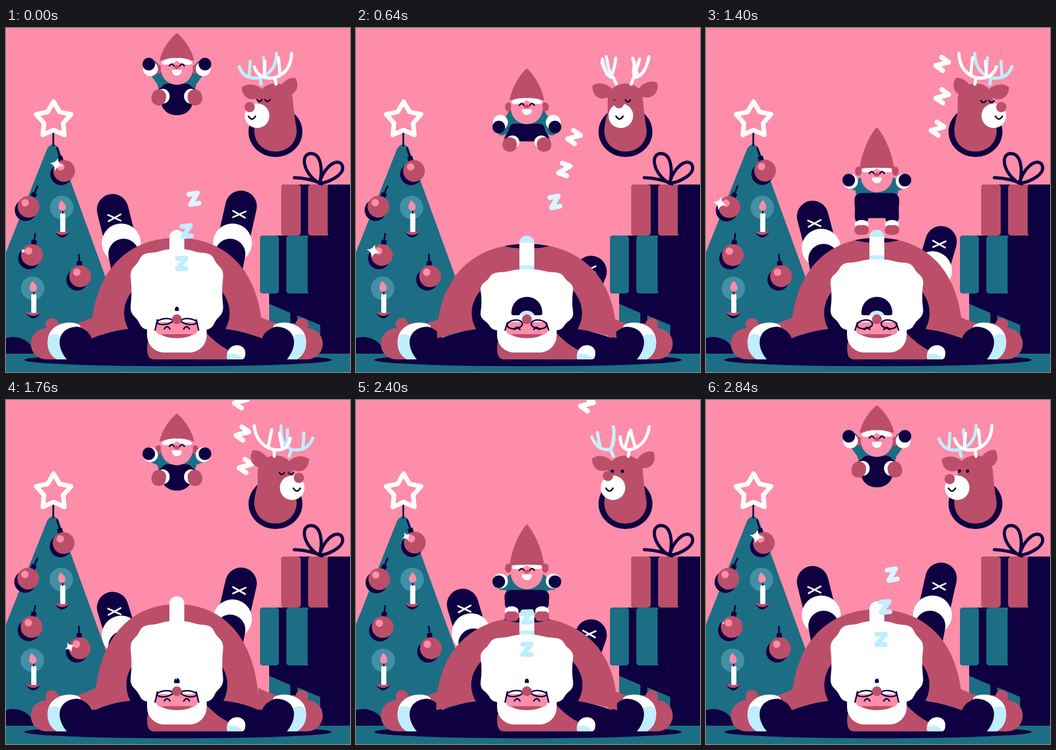
Animation of 600x600 px, one loop 2.88 s. Source, as an HTML page with a canvas:

```html
<!DOCTYPE html>
<html lang="en">
<head>
<meta charset="utf-8">
<title>Sleeping Santa</title>
<style>
html, body { margin: 0; height: 100%; overflow: hidden; background: #fd8da9; }
canvas { display: block; width: 100vw; height: 100vh; }
</style>
</head>
<body>
<canvas id="stage"></canvas>
<script>
const PINK = '#fd8da9', ROSE = '#bb4f6a', NAVY = '#0e0041', TEAL = '#1c6e84',
      ICE = '#bfeefe', WHITE = '#fff';
const LOOP = 2880, BOUNCE = 960, TAU = 2 * Math.PI;
const canvas = document.getElementById('stage');
const ctx = canvas.getContext('2d');
const dpr = window.devicePixelRatio || 1;
canvas.width = canvas.height = 600 * dpr;

const clamp = v => Math.max(0, Math.min(1, v));
const mix = (a, b, k) => a + (b - a) * k;
const smooth = (a, b, v) => { const k = clamp((v - a) / (b - a)); return k * k * (3 - 2 * k); };
// Eases up from a to b, back down from c to d
const bump = (v, a, b, c, d) => smooth(a, b, v) * (1 - smooth(c, d, v));
const iceToWhite = k => `rgb(${mix(191, 255, clamp(k))},${mix(238, 255, clamp(k))},${mix(254, 255, clamp(k))})`;
const both = draw => { draw(-1); draw(1); };

function fill(d, color) { ctx.fillStyle = color; ctx.fill(new Path2D(d)); }
function line(d, color, width) {
  ctx.strokeStyle = color; ctx.lineWidth = width; ctx.stroke(new Path2D(d));
}
function oval(x, y, rx, ry, color, tilt = 0) {
  ctx.fillStyle = color; ctx.beginPath();
  ctx.ellipse(x, y, rx, ry, tilt, 0, TAU); ctx.fill();
}
const disc = (x, y, r, color) => oval(x, y, r, r, color);
function box(x, y, w, h, r, color) {
  ctx.fillStyle = color; ctx.beginPath(); ctx.roundRect(x, y, w, h, r); ctx.fill();
}
function placed(x, y, degrees, draw, sx = 1, sy = sx) {
  ctx.save(); ctx.translate(x, y); ctx.rotate(degrees * Math.PI / 180); ctx.scale(sx, sy);
  draw(); ctx.restore();
}
function clipped(shape, draw) { ctx.save(); ctx.clip(shape); draw(); ctx.restore(); }
const arch = (x, y, r, rise) => `M${x - r} ${y}Q${x} ${y - rise * r * 1.6} ${x + r} ${y}`;
const polygon = (n, point) =>
  Array.from({ length: n }, (_, i) => point(i * TAU / n, i)).map(p => p.join(' ')).join('L').replace(/^/, 'M') + 'Z';

function bauble(x, y, hookX, hookY, sway) {
  placed(hookX, hookY, -sway * 2.2, () => {
    const r = 19, dx = x - hookX, dy = y - hookY, k = 1 - (r + 3) / Math.hypot(dx, dy);
    disc(dx - 5, dy + 6, r, NAVY);
    line(`M0 0L${dx * k} ${dy * k}`, NAVY, 3);
    placed(dx * k, dy * k, Math.atan2(dy, dx) * 180 / Math.PI, () => box(-4.5, -4.5, 9, 9, 1, NAVY));
    disc(dx, dy, r, ROSE);
    disc(dx - 6, dy - 7, 6.5, PINK);
  });
}

function candle(x, y, sway) {
  disc(x - .5 + sway, y - 42, 20.5, '#438fa5');
  fill(arch(x, y, 13, -1), NAVY);
  fill(arch(x, y, 13, -.6), ROSE);
  box(x - 3.5, y - 32, 9, 33, 2, WHITE);
  line(`M${x + 1} ${y - 32}V${y - 37}`, NAVY, 2);
  placed(x + 1, y - 36, sway * 8 - 5, () => fill('M0 0C-9 -2 -8 -10 0 -19C8 -10 9 -2 0 0', PINK));
}

function twinkle(t, x, y, start, length = 980) {
  const u = ((t - start + LOOP) % LOOP) / length;
  if (u >= 1) return;
  placed(x, y, (u - .5) * 90, () =>
    fill('M0 -1Q.14 -.14 1 0Q.14 .14 0 1Q-.14 .14 -1 0Q-.14 -.14 0 -1', WHITE), 13 * Math.sin(Math.PI * u) ** .6);
}

function tree(t, p) {
  const sway = Math.sin(p / BOUNCE * TAU - .45);
  fill('M0 391L72 210Q82 196 92 210L222 568H0Z', TEAL);
  oval(12, 568, 36, 29, NAVY);
  line('M82.5 178V205', NAVY, 3);
  line(polygon(10, (a, i) => [83 + (i % 2 ? 17.5 : 32) * Math.sin(a), 160.5 - (i % 2 ? 17.5 : 32) * Math.cos(a)]), WHITE, 8);
  bauble(102, 249, 89, 209, sway);
  bauble(40, 312, 55, 276, sway);
  bauble(46, 396, 51, 359, sway);
  bauble(130, 433, 127, 395, sway);
  candle(98, 355, sway);
  candle(47.5, 496, sway);
  twinkle(t, 88, 238, 2240);
  twinkle(t, 30, 389, 2820, 1060);
  twinkle(t, 24, 306, 760);
  twinkle(t, 111, 431, 1600, 800);
}

function gift(x, y, h, color, lidWidth, bandX, bandWidth, restX) {
  box(x, y, 610 - x, h, 5, NAVY);
  box(x, y, lidWidth, h, 5, color);
  box(bandX, y, bandWidth, h, 5, color);
  box(restX, y, 610 - restX, h, 5, NAVY);
}

function presents() {
  box(459, 460, 141, 108, 0, NAVY);
  fill('M459 481L496 497V545H459ZM508 501L548 518V545H508Z', TEAL);
  gift(443, 362, 101, TEAL, 33, 489, 41, 526);
  gift(480, 273, 89, ROSE, 34, 527, 38, 561);
  line('M503 261Q530 262 551 272M547 271C520 256 512 222 530 219C550 217 553 248 547 271C552 248 573 226 585 237C596 254 564 269 547 271', NAVY, 5.5);
}

function leg(side, p) {
  const drop = 1.5 * bump(side < 0 ? p : p + 65, 400, 640, 610, 910);
  const lead = side < 0 ? 0 : -6, top = 317 + lead + drop * 100, cuff = 375 + drop * 78;
  placed(298, 0, 0, () => {
    line(`M112 ${top}L99 ${Math.max(top, cuff - 6)}`, NAVY, 55);
    placed(109, 331 + lead + drop * 84, 0, () => line('M-11 -6L10 6M11 -5L-11 5', WHITE, 3));
    disc(97, cuff, 34, WHITE);
    line(`M93 ${cuff + 19}L86 ${cuff + 55}`, NAVY, 53);
  }, side, 1);
}

function arm() {
  fill('M-185 518Q-160 512 -142 502V545H-185Z', ROSE);
  disc(-218, 517, 11, ROSE);
  fill('M-170 578H-226C-262 578 -266 526 -226 523C-212 512 -180 512 -170 523Z', ROSE);
  fill('M-168 520C-177 509 -212 512 -222 532C-230 550 -224 570 -209 578H-180Z', WHITE);
  fill('M-223 537Q-214 530 -203 538Q-208 560 -190 578H-209C-224 570 -228 554 -223 537', ICE);
  fill('M0 578H-192C-215 550 -205 521 -172 521Q-155 526 -148 541Q-117 529 -87 525L0 510Z', NAVY);
}

function santaBody(p, beard) {
  // The belly springs back after each landing
  const tau = Math.max(0, p - 450);
  const dent = 36 * Math.exp(-tau / 270) * Math.sin(tau / 240 * Math.PI);
  const top = 366 + dent, rx = 149.5 + dent * .65, ry = 541 - top, bulge = .62;

  both(side => leg(side, p));
  oval(300, 579, 268, 11, NAVY);
  both(side => placed(298, 0, 0, arm, -side, 1));
  const dome = new Path2D(`M${298 - rx} 541C${298 - rx} ${541 - ry * bulge} ${298 - rx * bulge} ${top} 298 ${top}` +
    `S${298 + rx} ${541 - ry * bulge} ${298 + rx} 541Q415 529 385 525H211Q181 529 ${298 - rx} 541`);
  const open = bump(p, 380, 460, 600, 740);
  ctx.fillStyle = ROSE; ctx.fill(dome);
  clipped(dome, () => oval(298, top, 44, 10 * open, NAVY));
  oval(298, 497, 92 + dent * .4, 72, NAVY);

  box(285, top - 14, 26, beard - top + 40, [13, 13, 0, 0], WHITE);
  ctx.globalAlpha = clamp(open * 2);
  box(285, top - 14, 26, 12, [13, 13, 0, 0], ICE);
  box(285, beard - 8, 26, 20, 0, ICE);
  ctx.globalAlpha = 1;
}

function santaHead(t, beard) {
  fill('M247 548Q243 578 258 578H385Q398 576 388 562Q365 550 346 528Z', ROSE);
  const pom = new Path2D('M386 578C380 546 423 546 417 572Q416 578 410 578Z');
  ctx.fillStyle = WHITE; ctx.fill(pom);
  clipped(pom, () => oval(397, 578, 16, 10, ICE, .2));

  // Rippled, squarish beard with a fringe below it
  const ry = (532 - beard) / 2, squarish = v => Math.sign(v) * Math.abs(v) ** (2 / 3);
  fill(polygon(120, a => {
    const ripple = 1 + .022 * Math.cos(10 * a);
    return [298 + 81 * ripple * squarish(Math.sin(a)), beard + ry - ry * ripple * squarish(Math.cos(a))];
  }), WHITE);
  box(246, 505, 104, 61, [0, 0, 30, 30], WHITE);

  const gape = bump(t, 180, 600, 1420, 1820);
  fill('M263 513H333Q340 536 321 536H275Q256 536 263 513', PINK);
  fill('M270 534H326Q318 541 298 541Q278 541 270 534', ROSE);
  line(arch(281, 525 + gape, 5, 1) + arch(315, 525 + gape, 5, 1), NAVY, 2.5);

  const w = mix(3.5, 27, gape), h = mix(7, 32, gape), y = mix(493.5, 501, gape);
  const mouth = new Path2D(`M${298 - w} ${y - 3}C${298 - w} ${y - h * 1.3} ${298 + w} ${y - h * 1.3} ${298 + w} ${y - 3}Q${298 + w} ${y} ${298 + w * .85} ${y}H${298 - w * .85}Q${298 - w} ${y} ${298 - w} ${y - 3}`);
  ctx.fillStyle = NAVY; ctx.fill(mouth);
  clipped(mouth, () => oval(298, y + 2, w * .5, 10 * gape, ICE));

  const lens = mix(5, 7.5, gape), lensY = mix(512, 517, gape);
  both(side => {
    ctx.strokeStyle = NAVY; ctx.lineWidth = 2.5; ctx.beginPath();
    ctx.ellipse(298 + side * 21, lensY, 13.5, lens, side * .12, 0, TAU); ctx.stroke();
    line(`M${298 + side * 34} ${lensY - 3}L${298 + side * 38} 527`, NAVY, 2.5);
  });
  disc(298, 508, 8.5, ROSE);
}

function gnome(p) {
  const fall = 68 + 230 * ((p + 20) / 500) ** 2.5;
  const rise = 68 + 7.7e-4 * (940 - p) ** 2;
  const y = mix(Math.min(fall, 325), rise, smooth(500, 620, p));
  const stand = bump(p, 200, 440, 540, 700), sit = 1 - stand;
  const crouch = bump(p, 440, 490, 540, 640);
  const trail = bump(p, 320, 620, 640, 920);
  const tip = 59 + 23 * stand, handY = 41 * trail - 5;
  const footX = 31.5 - 5 * stand, footY = 53 + 43 * stand - 20 * crouch;
  const hips = 39 - 11 * sit, waist = 32 - 3 * sit, seat = 84 - 23 * trail;

  placed(298, y, 0, () => {
    box(-37 + 3 * sit, 3, 74 - 6 * sit, 42, 16, TEAL);
    both(s => line(`M${s * 27} 22L${s * 43} ${handY + 4}`, TEAL, 21));
    box(-hips, waist, hips * 2, seat - waist, [12, 12, 26, 26], NAVY);
    both(s => {
      line(`M${s * mix(26, 17, sit)} ${mix(50, 43, sit)}L${s * (footX - 4 * sit)} ${footY - mix(22, 3, sit)}`, NAVY, 24);
      oval(s * (footX - 7 * sit), footY - mix(9, 2, sit), 12, mix(8, 13, sit), WHITE);
      placed(s * footX, footY, -s * 12 * sit, () =>
        box(-12.5, mix(-8, -14, sit), 25, mix(17, 28, sit), mix(8, 12, sit), ROSE));
      oval(s * 32, mix(-6, 4, sit), 6, 8, ROSE);
    });
    disc(0, 3, 28, PINK);
    both(s => oval(s * 13, -10, 14, 5, WHITE, s * .25));
    const hat = `M-29 -12C-24 ${-tip * .55} -10 ${-tip * .85} 0 ${1 - tip}C10 ${-tip * .85} 24 ${-tip * .55} 29 -12Q0 ${mix(-14, -22, sit)} -29 -12Z`;
    fill(hat, ROSE);
    line(hat, ROSE, 2);
    line(arch(-9, -2, 4, 1) + arch(9, -2, 4, 1), NAVY, 2.5);
    oval(0, 0, 5, 3, ROSE);
    fill('M-9 5H9Q8 15 0 15Q-8 15 -9 5', WHITE);
    both(s => {
      disc(s * 46, mix(handY, 15, .4), 13, WHITE);
      disc(s * 49, handY, 11, NAVY);
    });
  });
}

function snores(t) {
  for (let i = 0; i < 3; i++) {
    for (const time of [t, t - LOOP]) {
      const y = 298 + 56.5 * i - .168 * time, climb = 500 - y;
      if (y < -30 || y > 490) continue;
      const x = 298 + 118 * smooth(60, 420, climb) - 10 * smooth(400, 500, climb) +
        (i - 1) * 11 * Math.sin(Math.PI * climb / 450);
      const tilt = 45 * smooth(195, 290, climb) - 10 * smooth(90, 190, climb);
      placed(x, y, tilt, () => line('M-7.5 -9H7.5L-7.5 9H7.5', iceToWhite((350 - y) / 110), 8.5), clamp((492 - y) / 50));
    }
  }
}

function antler(side, turn) {
  const depth = Math.sqrt(1 - turn * turn), baseX = 470 + side * 13 + 12 * turn;
  // Forward, up and outward distances from the base
  const at = (u, v, out) => `${baseX + u * turn + side * out * depth} ${98 + v + u * .28 * Math.abs(turn)}`;
  line(`M${at(0, 0, 0)}L${at(2, -12, 5)}M${at(38, -41, 16)}Q${at(30, -15, 10)} ${at(2, -12, 8)}Q${at(-26, -13, 18)} ${at(-27, -46, 25)}` +
       `M${at(21, -18, 11)}Q${at(20, -32, 17)} ${at(19, -45, 20)}M${at(-7, -13, 11)}Q${at(-6, -30, 4)} ${at(-4, -45, 2)}`,
    iceToWhite(1 - side * turn * 1.25), 5.5);
}

function reindeer(t) {
  const swing = 85 * Math.PI / 180;
  const turn = -Math.sin(swing * Math.cos(t / LOOP * TAU)) / Math.sin(swing);
  const depth = Math.sqrt(1 - turn * turn), far = turn < 0 ? -1 : 1;
  oval(470, 181, 47, 44, NAVY);
  antler(far, turn);
  both(side => {
    const lift = -side * turn;
    placed(470 + side * (25 - 14 * Math.max(0, lift) ** 4), 113, 0, () => {
      ctx.rotate(lift * (lift > 0 ? 24 : 8) * Math.PI / 180);
      fill('M4 -4C-8 -20 -25 -19 -32 -14C-34 0 -24 12 -10 9L4 6Z', ROSE);
    }, -side, 1);
  });
  fill('M433 178Q434 164 439 148V124C442 88 497 88 500 122Q502 148 507 178C507 228 433 228 433 178', ROSE);
  antler(-far, turn);

  const awake = t > 2060 && t < 2860;
  both(side => {
    const x = 470 + 21 * turn + side * (7 + 2.5 * depth), y = 126 + turn;
    if (awake) disc(x, y - 1, 3, NAVY);
    else line(arch(x, y - .5, 4.5, -1), NAVY, 2.5);
  });
  const muzzleX = 470 + 32 * turn;
  disc(muzzleX, 153, 21.5, WHITE);
  line(arch(muzzleX + 9 * turn, 154, 6, -1), NAVY, 2.8);
  disc(470 + 45 * turn, 131 + 7 * turn ** 4, 9, ROSE);
}

function draw(now) {
  const t = now % LOOP, p = t % BOUNCE;
  ctx.setTransform(dpr, 0, 0, dpr, 0, 0);
  ctx.lineCap = ctx.lineJoin = 'round';
  box(0, 0, 600, 600, 0, PINK);
  tree(t, p);
  presents();
  box(0, 568, 600, 32, 0, TEAL);
  const beard = 387 + 35 * bump(p, 260, 620, 660, 800);
  santaBody(p, beard);
  santaHead(t, beard);
  gnome(p);
  snores(t);
  reindeer(t);
}

const start = performance.now();
function tick() {
  draw(performance.now() - start);
  requestAnimationFrame(tick);
}
tick();
</script>
</body>
</html>
```
